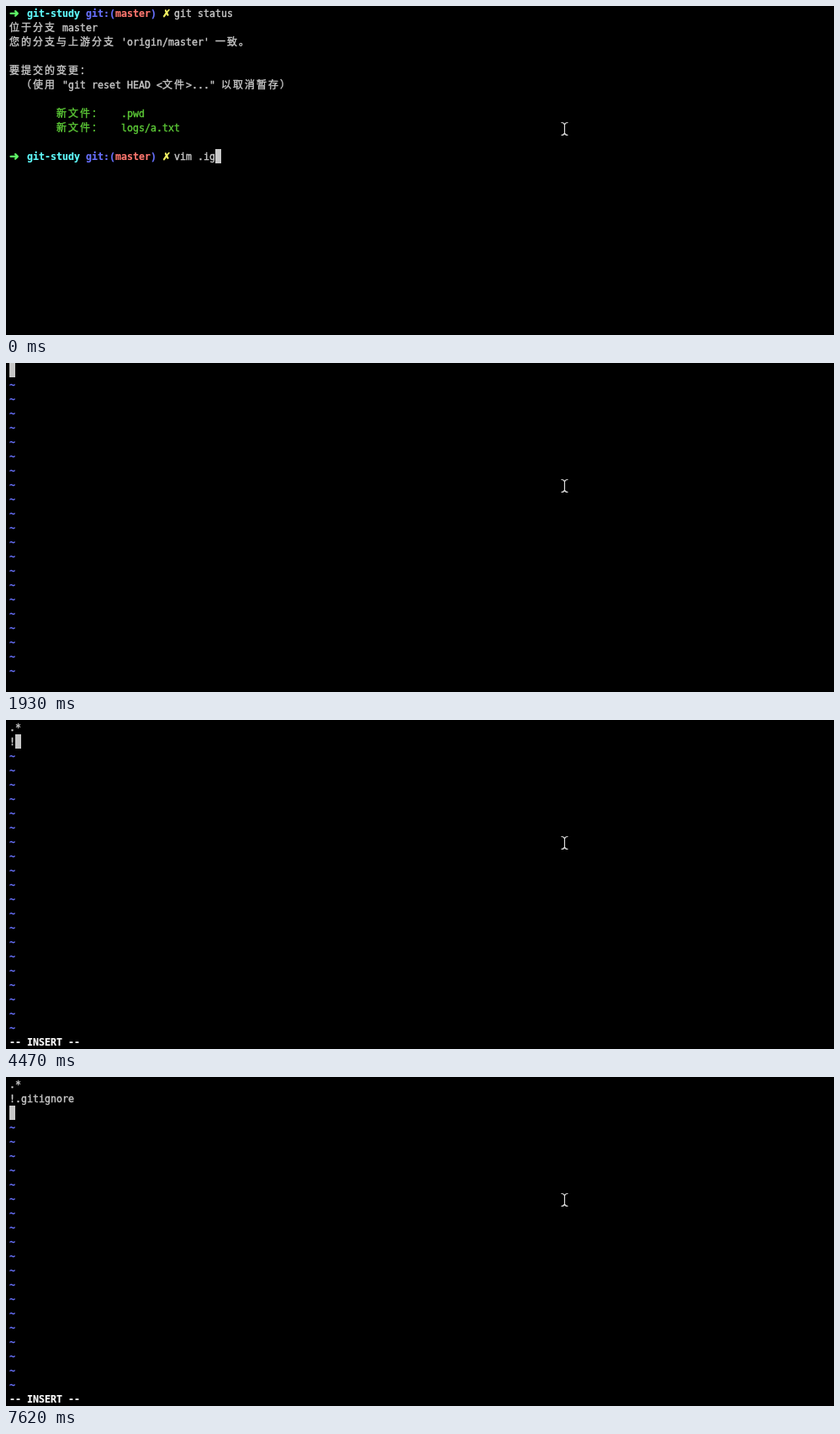
Recreate the animation shown at these times as an HTML page. Size 985x391 px, loop 8 s.

```html
<!DOCTYPE html>
<html lang="zh-CN">
<head>
<meta charset="utf-8">
<title>Terminal</title>
<style>
  html, body { margin: 0; width: 100%; height: 100%; overflow: hidden; background: #000; }
  svg { display: block; width: 985px; height: 391px; background: #000; }
  text {
    font: 11.63px "DejaVu Sans Mono", "Noto Sans Mono", monospace;
    color: #c7c7c7;
    fill: currentColor;
    stroke: currentColor;
    stroke-width: .4px;
    white-space: pre;
  }
  .cjk { font: 12px "Noto Sans CJK SC", "Noto Sans CJK", sans-serif; letter-spacing: 2px; }
  .sym { font: bold 12px "DejaVu Sans", sans-serif; stroke-width: .6px; }
  .arrow { font-size: 14px; }
  .bold { font-weight: bold; stroke-width: .15px; }
  .lime { color: #5ffa68; }
  .cyan { color: #60fdff; }
  .blue { color: #6871ff; }
  .red { color: #ff776f; }
  .yellow { color: #fffc67; }
  .green { color: #5bc736; }
  .white { color: #fff; }
  #caret { fill: #c7c7c7; }
  #mouse { fill: none; stroke: #ddd; stroke-width: 1.2; }
</style>
</head>
<body>
<svg viewBox="0 0 985 391">
  <g id="shell"></g>
  <g id="editor"></g>
  <rect id="caret" width="7" height="17"/>
  <path id="mouse" d="M660.5 138.5q3.4 0 4 2.5q.6-2.5 4-2.5M664.5 141v10M660.5 153.5q3.4 0 4-2.5q.6 2.5 4 2.5"/>
</svg>
<script>
const CELL = 7, LINE = 17, LEFT = 4, BASE = 13, LOOP = 8000;
const PROMPT_ROW = 10, CMD_COL = 28, STATUS_ROW = 22;
const $ = id => document.getElementById(id);
const shell = $('shell'), editor = $('editor'), caret = $('caret');

function put(parent, col, row, str, cls = '') {
  const el = document.createElementNS('http://www.w3.org/2000/svg', 'text');
  el.setAttribute('x', LEFT + col * CELL);
  el.setAttribute('y', row * LINE + BASE);
  el.setAttribute('class', cls);
  el.textContent = str;
  parent.append(el);
  return el;
}

// Lays out mixed text, giving wide characters two cells each.
function mixed(col, row, str, cls = '') {
  for (const run of str.match(/[\u3000-\uffef]+|[^\u3000-\uffef]+/g)) {
    const wide = run.charCodeAt(0) >= 0x3000;
    const pad = run.length - run.trimStart().length;
    put(shell, col + pad, row, run.trim(), wide ? 'cjk ' + cls : cls);
    col += run.length * (wide ? 2 : 1);
  }
}

function prompt(row) {
  put(shell, 0, row, '➜', 'sym arrow lime');
  put(shell, 3, row, 'git-study', 'bold cyan');
  put(shell, 13, row, 'git:(', 'bold blue');
  put(shell, 18, row, 'master', 'bold red');
  put(shell, 24, row, ')', 'bold blue');
  put(shell, 26, row, '✗', 'sym yellow');
}

prompt(0);
put(shell, CMD_COL, 0, 'git status');
mixed(0, 1, '位于分支 master');
mixed(0, 2, "您的分支与上游分支 'origin/master' 一致。");
mixed(0, 4, '要提交的变更：');
mixed(2, 5, '（使用 "git reset HEAD <文件>..." 以取消暂存）');
mixed(8, 7, '新文件：   .pwd', 'green');
mixed(8, 8, '新文件：   logs/a.txt', 'green');
prompt(PROMPT_ROW);
const command = put(shell, CMD_COL, PROMPT_ROW, '');

const lines = [0, 1, 2].map(row => put(editor, 0, row, ''));
const tildes = [];
for (let row = 1; row < STATUS_ROW; row++) {
  tildes[row] = put(editor, 0, row, '~', 'bold blue');
}
const mode = put(editor, 0, STATUS_ROW, '-- INSERT --', 'bold white');

const EDIT_START = 1930, INSERT_START = 2080;
const steps = [
  [0, 'vim .ig'], [300, 'vim .i'], [450, 'vim .'], [580, 'vim .gi'], [730, 'vim .git'],
  [1180, 'vim .giti'], [1330, 'vim .gitign'], [1480, 'vim .gitigno'], [1630, 'vim .gitignore'],
  [EDIT_START, ''], [2380, '.'], [3280, '.*'], [3570, '.*\n'], [4470, '.*\n!'],
  [4920, '.*\n!.'], [5220, '.*\n!'], [5670, '.*\n!.g'], [6120, '.*\n!.'],
  [6420, '.*\n!.gi'], [6570, '.*\n!.git'], [6870, '.*\n!.giti'], [7020, '.*\n!.gitign'],
  [7170, '.*\n!.gitigno'], [7320, '.*\n!.gitignore'], [7620, '.*\n!.gitignore\n']
];

const show = (el, on) => el.setAttribute('visibility', on ? 'visible' : 'hidden');

function moveCaret(col, row) {
  caret.setAttribute('x', LEFT + col * CELL);
  caret.setAttribute('y', row * LINE);
}

function draw(t) {
  const str = steps.findLast(([start]) => start <= t)[1];
  const editing = t >= EDIT_START;
  shell.style.display = editing ? 'none' : '';
  editor.style.display = editing ? '' : 'none';
  if (!editing) {
    command.textContent = str;
    moveCaret(CMD_COL + str.length, PROMPT_ROW);
    return;
  }
  const rows = str.split('\n'), last = rows.length - 1;
  lines.forEach((el, i) => { el.textContent = rows[i] || ''; });
  tildes.forEach((el, row) => show(el, row > last));
  show(mode, t >= INSERT_START);
  moveCaret(rows[last].length, last);
}

const begin = performance.now();
function tick() {
  draw((performance.now() - begin) % LOOP);
  requestAnimationFrame(tick);
}
tick();
</script>
</body>
</html>
```
